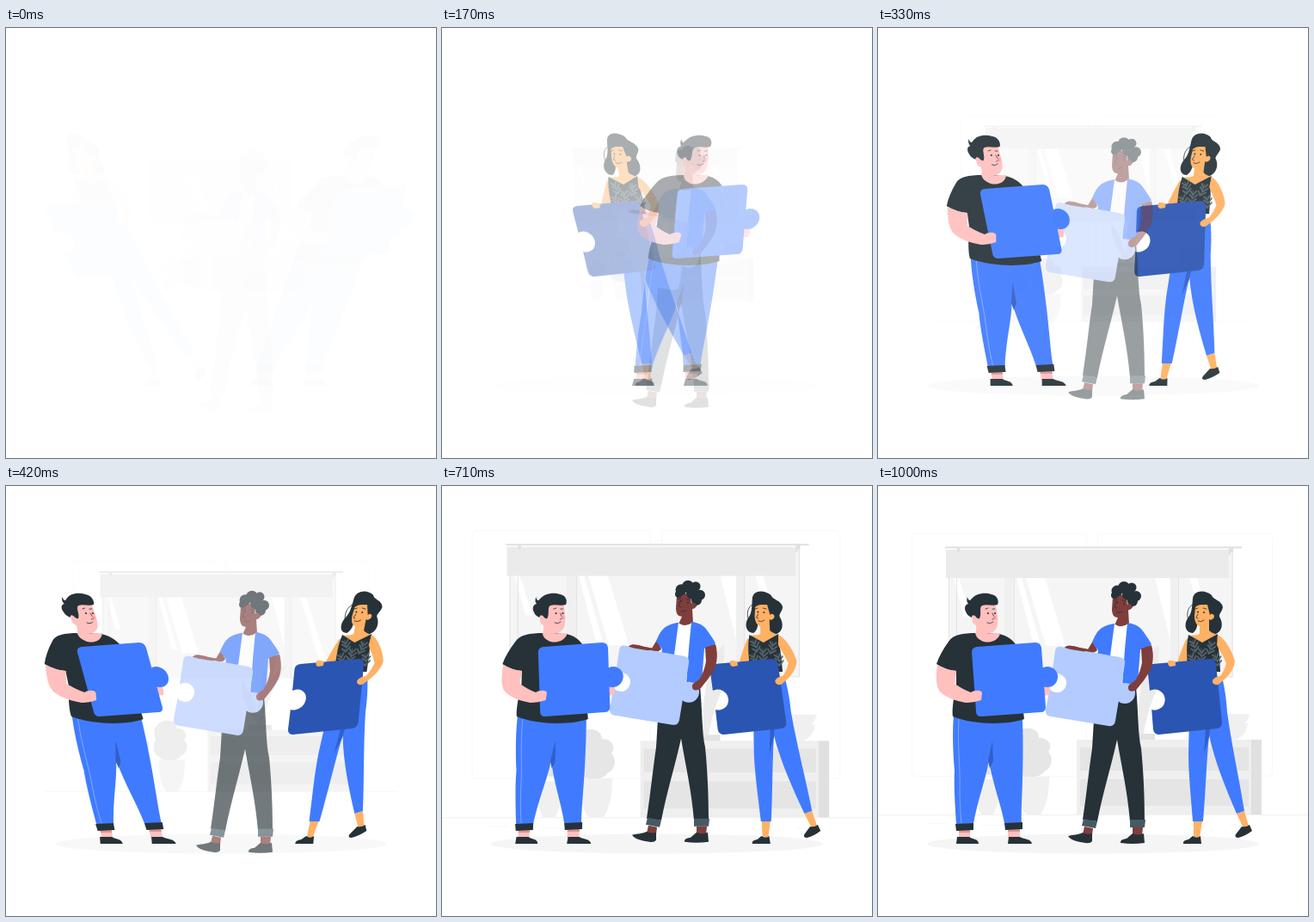
An HTML page that plays this animation: 500 by 500 pixels, repeating every 1040 ms.

```html
<!DOCTYPE html>
<html lang="en">
<head>
<meta charset="utf-8">
<title>Puzzle team</title>
<style>
  html, body { margin: 0; width: 100%; height: 100%; overflow: hidden; background: #fff; }
  svg { display: block; width: 100vw; height: 100vh; }
  .ink { fill: #263238; }
  .blue { fill: #407bff; }
  .pink { fill: #ffc0be; }
  .brown { fill: #7f3e3b; }
  .amber { fill: #ffb164; }
  .line { fill: none; stroke: #263238; stroke-width: .8; stroke-linecap: round; }
</style>
</head>
<body>
<svg viewBox="0 0 500 500">
  <defs>
    <g id="sprig" fill="none" stroke="#56646b" stroke-width="1.8" stroke-linecap="round">
      <path d="M0 0Q2 7 1 15" stroke-width=".7"/>
      <path d="M1 5L-3 1M1 5L4 0M2 9L-3 5M2 9L6 4M1 14L-3 10M1 14L6 9"/>
    </g>
  </defs>

  <ellipse id="shadow" cx="250" cy="416" rx="193" ry="11.5" fill="#f5f5f5"/>

  <g id="room">
    <g fill="none" stroke="#f8f8f8">
      <rect x="39.500" y="55.500" width="203" height="282" rx="4"/>
      <rect x="255.500" y="55.500" width="203" height="282" rx="4"/>
      <path d="M0 382.500H500" stroke="#f1f1f1"/>
      <path d="M58 392.500H80M120 394.500H166M366 391.500H385M408 394.500H440"/>
    </g>
    <path fill="#f5f5f5" d="M82 75H413V222H82Z"/>
    <path fill="#fff" d="M161 107H167L188 181H180ZM172 107H194L218 186H195ZM322 107H340V180ZM88 107H94L108 152H100ZM362 107H371L398 196H389Z"/>
    <path fill="#f0f0f0" d="M147 75H159V222H147ZM340 75H350V222H340Z"/>
    <path fill="none" stroke="#e3e3e3" d="M82.500 80V222M91.500 107V222M158.500 75V222M349.500 75V222M412 75V222H349"/>
    <path fill="#ebebeb" d="M79 74H408V107H79Z"/>
    <path fill="#e0e0e0" d="M78 70.500H423V72.500H78ZM92 72H95V77H92ZM408 72H413V77H410V80H408Z"/>

    <g fill="#ebebeb">
      <path d="M304 288C300 250 306 210 326 184C330 206 318 228 308 288Z"/>
      <path d="M305 288C306 250 318 216 343 202C340 222 320 226 309 288Z"/>
      <path d="M306 288C300 262 292 240 279 226C278 250 292 276 303 288Z"/>
    </g>
    <path fill="#e3e3e3" d="M288 288H322V296H288Z"/>
    <path fill="#f0f0f0" d="M385 276H430Q428 294 410 296H390ZM388 265H432Q430 275 422 278H388Z"/>
    <path fill="#efefef" d="M231 295H434V382H231Z"/>
    <path fill="#e5e5e5" d="M235 304H431V331H235ZM235 341H431V372H235Z"/>
    <path fill="#e0e0e0" d="M434 295H446V382H434Z"/>

    <g fill="#e6e6e6">
      <path d="M165 284C176 278 188 284 187 293C198 292 204 302 198 309C206 318 200 330 194 331C190 340 170 341 163 334C153 329 152 316 158 309C152 299 156 288 165 284Z"/>
      <circle cx="130" cy="318" r="18"/>
    </g>
    <path fill="#f0f0f0" d="M162 338H199C199 358 196 372 189 382H172C164 372 162 358 162 338ZM113 341H142C141 358 140 372 134 382H120C115 372 113 358 113 341Z"/>
  </g>

  <g id="woman">
    <path class="ink" d="M366 131C367 121 380 120 388 127C389 132 400 133 401 141C400 146 396 149 397 152C402 160 400 169 393 172C385 175 376 168 375 160L370 152C373 159 371 168 366 171C358 171 355 162 360 154C365 148 365 142 366 131Z"/>
    <path fill="none" stroke="#263238" stroke-width=".8" d="M366 138C361 140 358 148 361 156"/>
    <path class="amber" d="M369 141C372 137 379 138 383 138L386 150C388 147 393 150 390 154Q387 157 385 155L385 168C388 171 392 172 395 173L377 182L361 174C368 173 374 174 374 171L374 163C370 162 368 157 368 151Z"/>
    <path class="line" d="M369 143L372 142M378 142L382 143M372 149L370 153L372 154M372 157Q376 159 379 156"/>
    <circle class="ink" cx="372" cy="146.500" r="1"/><circle class="ink" cx="379" cy="147" r="1"/>
    <path class="amber" d="M359 177C354 187 350 199 347 208L360 208L364 184Z"/>
    <path class="blue" d="M362 270L361 310C361 336 364 362 366 390H378C381 355 382 320 385 290C392 322 405 353 417 381L426 378C420 340 411 300 406 263C405 246 403 236 401 226L380 225Z"/>
    <path fill="#2f5fc9" d="M381 282H386L385 292L379 311Z"/>
    <path class="amber" d="M367 390H377L374 408H367ZM417 381L426 378L431 395L425 398Z"/>
    <path class="ink" d="M366 407Q371 410 375 407L376 416H355Q354 412 361 411ZM423 396Q428 397 432 394L435 401Q427 407 419 409Q414 409 416 405Z"/>
    <path class="ink" d="M361 173L377 182L395 172C394 182 397 191 397 198L398 216H359C361 202 357 192 361 173Z"/>
    <use href="#sprig" transform="translate(365 179) rotate(-12)"/>
    <use href="#sprig" transform="translate(388 181) rotate(18)"/>
    <use href="#sprig" transform="translate(376 189) rotate(8)"/>
    <use href="#sprig" transform="translate(363 195) rotate(-15)"/>
    <use href="#sprig" transform="translate(392 195) rotate(-8)"/>
    <path fill="#2b55b2" d="M319 207L386 201Q392 201 393 207L400 275Q400 281 394 282L327 289Q321 289 320 283L318.200 260A12 12 0 1 0 316 238L313.500 213Q313 208 319 207Z"/>
    <path class="amber" d="M337 205Q337 202 341 203L346 204L346 209L340 210Q337 209 337 205Z"/>
    <path class="amber" d="M395 173C404 178 412 192 415 204C414 214 406 223 398 229C395 233 388 231 389 226C391 222 396 222 399 220C402 215 404 210 405 206C402 198 397 191 394 185Z"/>
  </g>

  <g id="middle">
    <path class="brown" d="M273 129C279 125 285 126 289 128L290 139C293 134 298 136 296 141Q293 145 291 144L292 161Q283 169 275 162L279 153C274 153 272 149 272 143Z"/>
    <g class="ink">
      <circle cx="278" cy="122" r="6.500"/><circle cx="286" cy="118" r="7"/>
      <circle cx="295" cy="118" r="5.500"/><circle cx="300" cy="128" r="6"/>
      <circle cx="291" cy="126" r="7"/><circle cx="296" cy="134" r="6"/>
      <circle cx="275" cy="127" r="4"/>
    </g>
    <circle class="brown" cx="292" cy="140" r="3"/>
    <path class="line" d="M274 133L278 132M284 133L288 134M277 135L275 141L278 142M278 147Q281 148 284 146"/>
    <circle class="ink" cx="278" cy="135" r="1"/><circle class="ink" cx="286" cy="137" r="1"/>
    <path class="brown" d="M250 180L255 191C251 196 241 194 235 193C229 196 220 192 217 188C220 184 228 186 233 188L244 190Z"/>
    <path fill="#fff" d="M270 162L276 161Q283 166 291 160L290 232H266Z"/>
    <path class="blue" d="M275 160L269 205L254 205L256 191L249 182C254 170 257 163 275 160ZM290 159C301 161 305 164 309 170C313 176 316 180 318 184Q313 189 305 190L302 228L284 232L287 190Z"/>
    <path class="ink" d="M252 255L300 234C303 265 302 288 306 305C309 335 310 365 310 390H293C290 355 284 330 278 295C270 330 262 355 255 390L238 388C243 355 245 332 249 305Z"/>
    <path fill="#455a64" d="M239 387L255 390L253 398L237 395ZM293 388H311L310 397H293Z"/>
    <path class="brown" d="M240 396L250 398L249 406L238 405ZM296 397H308L307 407H296Z"/>
    <path class="ink" d="M238 403Q243 406 249 404L249 413Q247 416 241 415C233 414 224 412 221 407C227 405 233 406 238 403ZM296 404Q302 407 309 404L310 415Q296 417 282 415Q281 411 289 410Z"/>
    <g fill="#b3cbff">
      <circle cx="287" cy="241" r="12"/>
      <path d="M213 187L281 199Q288 200 287 207L276 273Q275 280 268 279L201 268Q194 267 195 260L199.500 236A11 11 0 1 0 202 220L206 192Q207 186 213 187Z"/>
    </g>
    <path class="brown" d="M217 188C220 184 229 186 235 188L245 190L240 192.500L224 190Z"/>
    <path class="brown" d="M306 189L318 185C321 196 320 206 317 213C312 223 306 230 302 235C298 240 291 240 291 235C290 230 298 228 300 225C304 218 306 211 307 205Z"/>
  </g>

  <g id="man">
    <path class="pink" d="M192 233L198 232Q202 236 199 243L192 244Z"/>
    <path class="blue" d="M88 267C86 290 88 320 89 330C88 352 90 375 91 393H111C117 360 126 340 129 318C132 342 143 370 147 392H167C166 370 170 335 168 270Z"/>
    <path fill="#315fc6" d="M133 296L134 320L130 328L128 320Z"/>
    <path fill="none" stroke="#8cafff" stroke-width=".8" d="M94 271C92 300 96 330 95 350Q95 375 97 392"/>
    <path class="pink" d="M94 398H107V409H94ZM151 398H165V409H151Z"/>
    <path fill="#d99591" d="M94 399H107V403H94ZM151 398H165V402H151Z"/>
    <path class="ink" d="M90 393L111 392V400L91 401ZM147 392L168 391V399L148 400ZM92 408H106C110 411 117 410 117 416H91ZM152 408H165C170 411 178 410 179 416H151Z"/>
    <path class="ink" d="M115 171C98 171 87 173 82 181C76 189 71 198 68 207Q79 214 91 215V232C87 250 86 262 87 268C112 278 150 278 170 271L160 184C154 176 148 174 141 172Z"/>
    <path class="pink" d="M110 149C114 137 132 134 137 139C138 146 141 158 138 165C135 170 130 172 127 171L128 172L142 171C141 180 127 185 119 179C115 177 114 174 113 171Q115 168 114 162C109 160 109 155 110 149Z"/>
    <path class="ink" d="M104 129C105 133 107 134 108 132C113 125 124 123 132 126C139 127 141 134 139 138C133 140 127 137 121 139C117 142 121 148 118 154Q115 155 113 151Q109 149 109 153C105 151 103 149 102 146C100 142 101 138 105 137C103 135 103 132 104 129Z"/>
    <path class="line" d="M125 143L128 142M133 143L136 143M133 148L136 154L133 155M127 159Q131 161 134 158"/>
    <circle class="ink" cx="128" cy="148" r="1.100"/><circle class="ink" cx="136" cy="148" r="1.100"/>
    <circle cx="136" cy="153" r="2.500" fill="#ff9c9c" opacity=".7"/>
    <g class="blue">
      <circle cx="197" cy="222" r="12"/>
      <path d="M115 187L183 182Q189 182 190 188L195 257Q195 263 189 263L120 268Q114 268 114 262L109 193Q109 188 115 187Z"/>
    </g>
    <path class="pink" d="M69 208Q79 214 91 215L89 230C94 233 102 238 108 240C113 237 121 237 121 241L120 249C114 251 108 252 102 252C90 250 78 245 73 240C67 234 67 222 69 208Z"/>
  </g>
</svg>
<script>
  const LOOP = 1040, STEP = 1000 / 24, LEAD = 32;
  const [shadow, room, woman, middle, man] =
    ["shadow", "room", "woman", "middle", "man"].map(id => document.getElementById(id));

  const mix = (a, b, p) => a + (b - a) * p;
  const curve = (a, b, u) => 3 * (1 - u) * (1 - u) * u * a + 3 * (1 - u) * u * u * b + u * u * u;

  // cubic-bezier(.36, -.01, .5, 1.38)
  function ease(x) {
    if (x <= 0) return 0;
    if (x >= 1) return 1;
    let lo = 0, hi = 1;
    for (let i = 0; i < 24; i++) {
      const u = (lo + hi) / 2;
      if (curve(.36, .5, u) < x) lo = u; else hi = u;
    }
    return curve(-.01, 1.38, lo);
  }

  // time, slide, lean
  const rush = [[0, 250, .364], [.6, 0, -.176], [.8, 0, .035], [1, 0, 0]];

  function rushAt(x) {
    const i = x < .6 ? 0 : x < .8 ? 1 : 2;
    const a = rush[i], b = rush[i + 1];
    const p = ease((x - a[0]) / (b[0] - a[0]));
    return { slide: mix(a[1], b[1], p), lean: mix(a[2], b[2], p), alpha: i ? 1 : p };
  }

  function place(el, alpha, transform) {
    el.setAttribute("opacity", Math.max(0, Math.min(1, alpha)));
    if (transform) el.setAttribute("transform", transform);
  }

  const sheared = (slide, lean) => `matrix(1 0 ${-lean} 1 ${slide + lean * 266} 0)`;

  function draw(t) {
    const step = t < 80 ? 0 : Math.min(24, Math.floor((t + 4) / STEP));
    const x = Math.min(1, (step * STEP + LEAD) / 1000);
    const p = ease(x), r = rushAt(x);
    place(shadow, p);
    place(room, p, `translate(250 231) scale(${mix(.5, 1, p)}) translate(-250 -231)`);
    place(middle, p, `translate(0 ${mix(30, 0, p)})`);
    place(man, r.alpha, sheared(r.slide, r.lean));
    place(woman, r.alpha, sheared(-r.slide, -r.lean));
  }

  const start = performance.now();
  function tick() {
    draw((performance.now() - start) % LOOP);
    requestAnimationFrame(tick);
  }
  tick();
</script>
</body>
</html>
```
